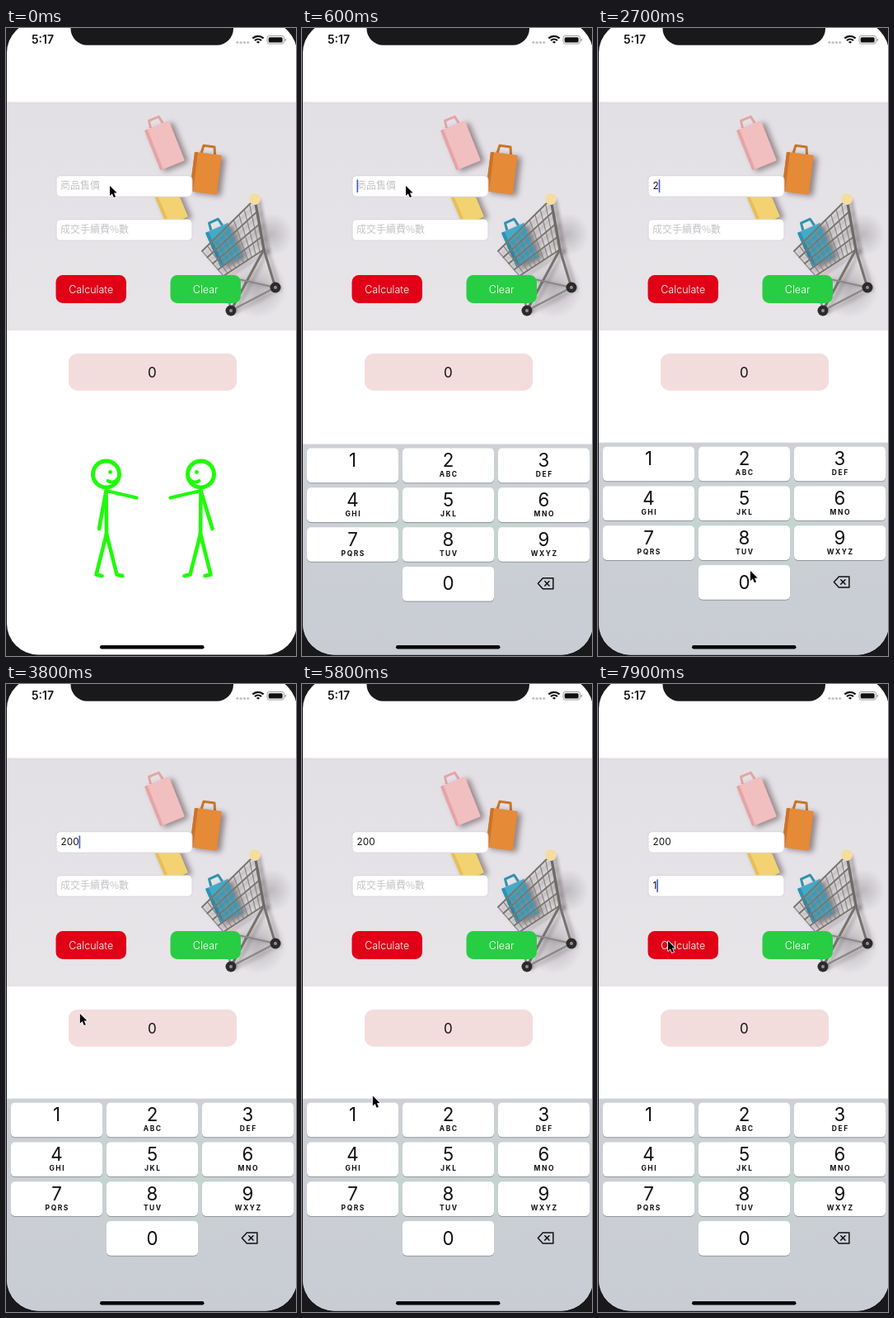
Write an HTML page with a canvas that moves like this. It is 352x760 px and loops after 8000 ms.

```html
<!DOCTYPE html>
<html lang="zh-Hant">
<head>
<meta charset="utf-8">
<style>
html, body { margin: 0; width: 352px; height: 760px; overflow: hidden; background: #19191b; }
canvas { display: block; width: 352px; height: 760px; }
</style>
</head>
<body>
<canvas id="stage"></canvas>
<script>
const W = 352, H = 760, LOOP = 8000;
const canvas = document.getElementById('stage');
const ctx = canvas.getContext('2d');
const ratio = window.devicePixelRatio || 1;
canvas.width = W * ratio;
canvas.height = H * ratio;

const LATIN = 'Inter, Roboto, sans-serif';
const CJK = '"Noto Sans CJK TC", "Noto Sans CJK", "Noto Sans CJK JP", sans-serif';
const DARK = '#19191b', INK = '#111', GREEN = '#20fa0a';
const TAU = Math.PI * 2;

function box(x, y, w, h, r, fill, stroke) {
  ctx.beginPath();
  ctx.roundRect(x, y, w, h, r);
  if (fill) { ctx.fillStyle = fill; ctx.fill(); }
  if (stroke) { ctx.strokeStyle = stroke; ctx.lineWidth = 1; ctx.stroke(); }
}
function line(points, color, width) {
  ctx.beginPath();
  points.forEach(([x, y]) => ctx.lineTo(x, y));
  ctx.strokeStyle = color;
  ctx.lineWidth = width;
  ctx.stroke();
}
function arc(x, y, r, from, to, color, width) {
  ctx.beginPath();
  ctx.arc(x, y, r, from, to);
  ctx.strokeStyle = color;
  ctx.lineWidth = width;
  ctx.stroke();
}
function disc(x, y, r, fill) {
  ctx.beginPath();
  ctx.arc(x, y, r, 0, TAU);
  ctx.fillStyle = fill;
  ctx.fill();
}
function glow(x, y, r, rgb, alpha) {
  const g = ctx.createRadialGradient(x, y, 0, x, y, r);
  g.addColorStop(0, `rgba(${rgb},${alpha})`);
  g.addColorStop(1, `rgba(${rgb},0)`);
  disc(x, y, r, g);
}
function fade(top, bottom, from, to) {
  const g = ctx.createLinearGradient(0, top, 0, bottom);
  g.addColorStop(0, from);
  g.addColorStop(1, to);
  ctx.fillStyle = g;
  ctx.fillRect(0, top, W, bottom - top);
}
function label(text, x, y, font, color = INK, align = 'center', spacing = 0) {
  ctx.font = font;
  ctx.fillStyle = color;
  ctx.textAlign = align;
  ctx.letterSpacing = spacing + 'px';
  ctx.fillText(text, x + spacing / 2, y);
  ctx.letterSpacing = '0px';
}
const mix = (a, b, k) => a.map((v, i) => v + (b[i] - v) * k);
const polar = ([x, y], angle, r) => [x + r * Math.cos(angle), y + r * Math.sin(angle)];

// ---- photo backdrop ----
function dropShadow(alpha) {
  ctx.shadowColor = `rgba(85,70,75,${alpha})`;
  ctx.shadowOffsetX = 5 * ratio;
  ctx.shadowOffsetY = 2 * ratio;
  ctx.shadowBlur = 7 * ratio;
}
function bag(x, y, w, h, angle, color, edge) {
  ctx.save();
  ctx.translate(x, y);
  ctx.rotate(angle);
  ctx.lineJoin = 'round';
  line([[w * .25, 0], [w * .3, -9], [w * .7, -9], [w * .75, 0]], edge, 3);
  dropShadow(0.6);
  box(0, 0, w, h, 1, color);
  ctx.shadowColor = 'transparent';
  box(0, 0, 4, h, 1, edge);
  ctx.restore();
}
function cart() {
  const handle = [302, 207], nose = [238, 270], heel = [264, 300], hip = [313, 268];
  const wheels = [[273, 342], [327, 314]];
  glow(322, 250, 26, '95,90,95', 0.3);
  glow(305, 315, 36, '95,90,95', 0.35);
  ctx.save();
  dropShadow(0.4);
  ctx.shadowBlur = 4 * ratio;
  ctx.lineCap = 'round';
  for (let k = 0; k <= 1.01; k += 0.1)
    line([mix(nose, handle, k), mix(heel, hip, k)], '#90908b', 1.3);
  for (let k = 0; k <= 1.01; k += 0.25)
    line([mix(nose, heel, k), mix(handle, hip, k)], '#77776f', 2);
  for (const wheel of wheels) {
    line([hip, wheel], '#74746e', 3);
    line([heel, wheel], '#888883', 2.2);
  }
  line(wheels, '#888883', 2.4);
  line([handle, hip], '#6c6c66', 3.4);
  ctx.restore();
  for (const [x, y] of wheels) {
    disc(x, y, 6.5, '#2c2b2c');
    disc(x, y, 2, '#92918f');
  }
  disc(...handle, 7, '#f4dda0');
}
function photo() {
  fade(89.5, 366, '#e3e0e5', '#e8e5e9');
  bag(168, 124, 32, 52, -0.38, '#f2bfc0', '#e5a4a8');
  bag(229, 150, 33, 48, 0.125, '#e58a36', '#c9732c');
  bag(177, 196, 28, 47, -0.4, '#f3d271', '#e6bf5c');
  bag(242, 248, 30, 45, -0.42, '#43aac8', '#3191b0');
  cart();
}

// ---- app screen ----
function field(y, text, hint, caretOn) {
  const font = `400 11.8px ${LATIN}`;
  box(61, y, 165, 25.5, 5, '#fff', '#d8d6da');
  if (text) label(text, 66.5, y + 16.5, font, INK, 'left');
  else label(hint, 66, y + 16.5, `400 12px ${CJK}`, '#c3c3c6', 'left');
  if (!caretOn) return;
  ctx.font = font;
  box(66.5 + ctx.measureText(text).width, y + 4.5, 1.6, 16, 1, '#4157d8');
}
function button(x, text, color) {
  box(x, 299, 85.5, 34, 8.5, color);
  label(text, x + 42.7, 320.7, `300 12.5px ${LATIN}`, '#fff');
}
// dir is the way the figure faces, reach how far its idle hand hangs back
function figure(x, dir, reach) {
  ctx.save();
  ctx.translate(x, 0);
  ctx.scale(dir, 1);
  ctx.lineCap = ctx.lineJoin = 'round';
  const neck = [0, 560], hip = [0.5, 612];
  arc(0, 540, 16, 0, TAU, GREEN, 5);
  disc(5, 537.5, 2.4, GREEN);
  arc(7, 541, 8.5, 0.5, 2.2, GREEN, 4);
  line([neck, hip], GREEN, 4.6);
  line([neck, [-reach, 606]], GREEN, 4.6);
  line([neck, [37, 568.5]], GREEN, 4.2);
  for (const side of [-1, 1]) {
    const foot = [0.5 + side * 12.5, 661.5];
    line([hip, foot, [foot[0] + 7, 663]], GREEN, 4.6);
  }
  ctx.restore();
}
function statusBar() {
  label('5:17', 44.5, 19, `600 14px ${LATIN}`);
  for (let i = 0; i < 4; i++) disc(280.8 + i * 4.3, 17.5, 1.6, '#c2c2c4');
  const up = -Math.PI / 2;
  for (let r = 1.8; r < 10; r += 3.7) arc(306, 19, r, up - 0.8, up + 0.8, INK, 2.2);
  box(317, 9.5, 20.5, 9.6, 2.8, null, '#9a9a9c');
  box(318.7, 11.2, 17, 6.2, 1.5, INK);
  box(338.7, 12.7, 1.4, 3.3, 0.7, '#9a9a9c');
}

// ---- keypad ----
const KEYS = ['1', '2ABC', '3DEF', '4GHI', '5JKL', '6MNO', '7PQRS', '8TUV', '9WXYZ', '', '0'];
const KEYPAD_TOP = 501.7;
const keyCorner = i => [6 + (i % 3) * 116, 5 + Math.floor(i / 3) * 47.8];

function keypad(top) {
  ctx.save();
  ctx.translate(0, top);
  fade(0, 262, '#cdd1d5', '#c9ccd4');
  for (const x of [122, 236]) glow(x, 98, 80, '180,225,190', 0.25);
  KEYS.forEach((key, i) => {
    if (!key) return;
    const [x, y] = keyCorner(i);
    box(x, y + 1, 111, 41.6, 4.8, '#92959b');
    box(x, y, 111, 41.6, 4.8, '#fff');
    label(key[0], x + 55.5, y + (key === '0' ? 28.4 : 22.6), `400 22.3px ${LATIN}`);
    label(key.slice(1), x + 55.5, y + 34.5, `700 8.5px ${LATIN}`, INK, 'center', 1.5);
  });
  ctx.translate(297.4, 168.7);
  ctx.lineJoin = ctx.lineCap = 'round';
  line([[-11, 0], [-5, -6.5], [7.5, -6.5], [7.5, 6.5], [-5, 6.5], [-11, 0]], INK, 1.5);
  for (const s of [-1, 1]) line([[-2.6, -2.7 * s], [2.6, 2.7 * s]], INK, 1.5);
  ctx.restore();
}
function keypadTop(t) {
  const s = Math.max(0, t - 170) * 0.0163;
  return KEYPAD_TOP + 260 * (1 + s) * Math.exp(-s);
}

// ---- pointer: each move eases towards a control, bowing sideways on the way ----
function onKey(digit, dx, dy) {
  const [x, y] = keyCorner(KEYS.findIndex(key => key[0] === digit));
  return [x + dx, KEYPAD_TOP + y + dy];
}
const HOME = [126, 191];
const MOVES = [
  { start: 950, end: 1200, to: onKey('2', 48, 22), bow: 0 },
  { start: 1850, end: 2400, to: onKey('0', 63, 7), bow: 0 },
  { start: 3450, end: 4450, to: [100, 242], bow: -45 },
  { start: 5200, end: 6150, to: onKey('1', 74, 22), bow: 10 },
  { start: 6950, end: 7900, to: [85, 311], bow: 0 }
];
function pointerAt(t) {
  return MOVES.reduce((from, { start, end, to, bow }) => {
    const u = Math.min(1, Math.max(0, (t - start) / (end - start)));
    const k = 1 - (1 - u) ** 2.25;
    const [x, y] = mix(from, to, k);
    return [x + bow * 4 * k * (1 - k), y];
  }, HOME);
}
function pointer([x, y]) {
  ctx.save();
  ctx.translate(x, y);
  ctx.scale(0.88, 0.88);
  ctx.lineJoin = 'round';
  const arrow = [[0, 0], [0, 13.5], [3.2, 10.7], [5.5, 16], [8, 15], [5.7, 9.8], [9.8, 9.6], [0, 0]];
  line(arrow, '#fff', 1.8);
  ctx.fillStyle = '#000';
  ctx.fill();
  ctx.restore();
}

// ---- typing ----
const EDITS = [
  { time: 300, index: 0, text: '' },
  { time: 1600, index: 0, text: '2' },
  { time: 2900, index: 0, text: '20' },
  { time: 3350, index: 0, text: '200' },
  { time: 4890, index: 1, text: '' },
  { time: 6680, index: 1, text: '1' }
];
function formAt(t) {
  const done = EDITS.filter(edit => edit.time <= t);
  const last = done[done.length - 1];
  const blinkOn = last && (t - last.time) % 1000 <= 500;
  return [0, 1].map(index => ({
    text: done.filter(edit => edit.index === index).pop()?.text ?? '',
    caret: blinkOn && last.index === index
  }));
}

function draw(t) {
  const [price, fee] = formAt(t);
  ctx.setTransform(ratio, 0, 0, ratio, 0, 0);
  ctx.fillStyle = DARK;
  ctx.fillRect(0, 0, W, H);
  ctx.save();
  ctx.beginPath();
  ctx.roundRect(1, -8, 352, 766.5, 38);
  ctx.clip();
  ctx.fillStyle = '#fff';
  ctx.fillRect(0, 0, W, H);
  photo();
  field(178.7, price.text, '商品售價', price.caret);
  field(231.7, fee.text, '成交手續費%數', fee.caret);
  button(60.5, 'Calculate', '#e20017');
  button(199.5, 'Clear', '#27ce43');
  box(76, 394, 204, 44.7, 11, '#f3dcdc');
  label('0', 177.3, 422.5, `400 17px ${LATIN}`);
  figure(121.5, 1, 8.5);
  figure(236.5, -1, 14);
  const top = keypadTop(t);
  if (top < H) keypad(top);
  statusBar();
  box(78.5, -20, 197.5, 40.7, 20, DARK);
  box(114, 747, 126.5, 4.4, 2.2, '#050505');
  ctx.restore();
  pointer(pointerAt(t));
}

const start = performance.now();
function tick() {
  draw((performance.now() - start) % LOOP);
  requestAnimationFrame(tick);
}
tick();
</script>
</body>
</html>
```
